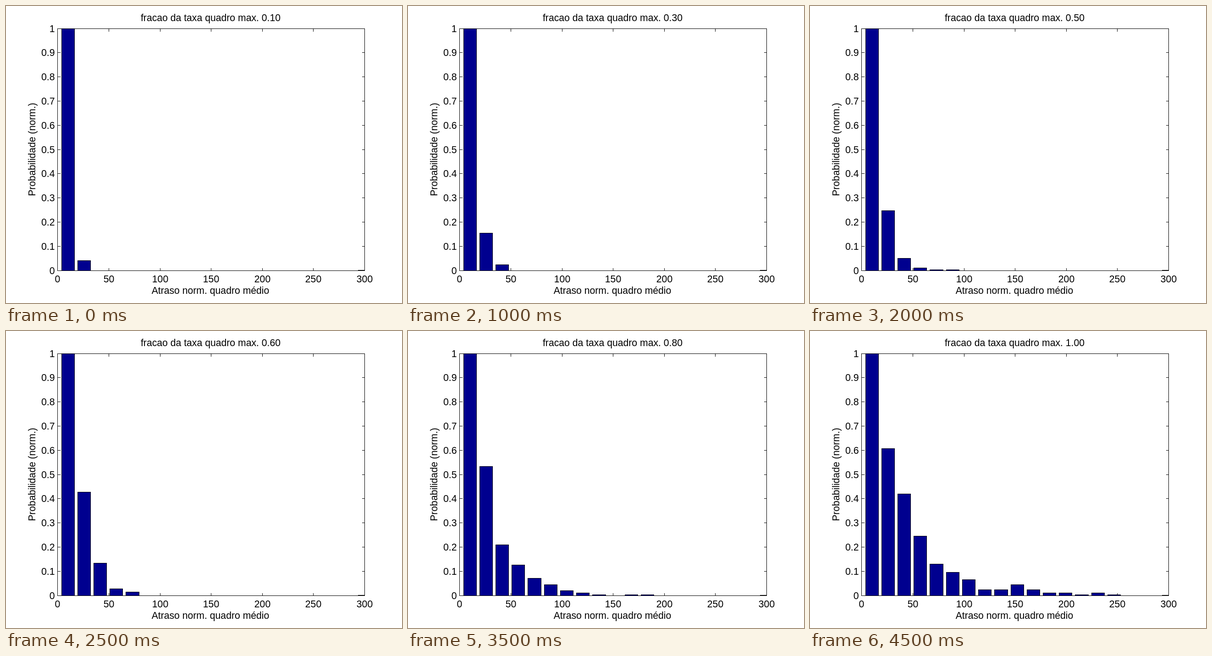
An HTML page that plays this animation: 864x648 px, repeating every 5 s.

```html
<!DOCTYPE html>
<html lang="pt">
<head>
<meta charset="utf-8">
<style>
  html, body { margin: 0; width: 100%; height: 100%; overflow: hidden; background: #fff; }
  svg { display: block; }
  text { font: 21.2px "Liberation Sans", Arial, Helvetica, sans-serif; text-anchor: middle; }
  .end { text-anchor: end; }
  path, rect { stroke: #000; stroke-width: 1; fill: none; shape-rendering: crispEdges; }
  rect { fill: #00008f; }
</style>
</head>
<body>
<svg width="864" height="648" viewBox="0 0 864 648">
  <text id="title" x="446.5" y="33"></text>
  <text x="446" y="628">Atraso norm. quadro médio</text>
  <text transform="translate(64 313) rotate(-90)">Probabilidade (norm.)</text>
  <g id="axes"></g>
  <g id="bars"></g>
  <path id="frame"/>
</svg>
<script>
const STEP = 500;
const LEFT = 112.3, RIGHT = 781.9, TOP = 48.6, BOTTOM = 576.7;
const TICK = 6;
const BAR_START = 120.6, BAR_PITCH = 35.22, BAR_WIDTH = 28.2;

// Bar heights in thousandths after the first bar, which is always 1.
const histograms = [
  [42],
  [92],
  [155, 24],
  [202, 36],
  [248, 50, 10, 3, 3],
  [428, 134, 28, 15],
  [480, 172, 70, 38, 17, 8, 3],
  [534, 209, 126, 72, 44, 20, 10, 3, 0, 3, 3],
  [641, 400, 215, 142, 90, 41, 41, 28, 24, 7, 10, 3, 0, 3, 3, 0, 0, 3],
  [607, 420, 246, 130, 96, 66, 24, 24, 45, 24, 10, 10, 3, 10, 3]
];

const byId = id => document.getElementById(id);
const snap = v => Math.round(v) + 0.5;
const xAt = v => snap(LEFT + (RIGHT - LEFT) * v / 300);
const yAt = v => snap(BOTTOM - (BOTTOM - TOP) * v);

function buildAxes() {
  const x0 = xAt(0), x1 = xAt(300), y0 = yAt(0), y1 = yAt(1);
  let ticks = '', labels = '';
  for (let v = 0; v <= 300; v += 50) {
    const x = xAt(v);
    ticks += `M${x} ${y0}v${-TICK}M${x} ${y1}v${TICK}`;
    labels += `<text x="${x}" y="603">${v}</text>`;
  }
  for (let i = 0; i <= 10; i++) {
    const y = yAt(i / 10);
    ticks += `M${x0} ${y}h${TICK}M${x1} ${y}h${-TICK}`;
    labels += `<text class="end" x="106.5" y="${y + 7.5}">${i / 10}</text>`;
  }
  // The baseline of the last bin sits one pixel above the axis.
  ticks += `M768 ${y0 - 1}H${x1}`;
  byId('axes').innerHTML = `<path d="${ticks}"/>${labels}`;
  byId('frame').setAttribute('d', `M${x0} ${y0}V${y1}H${x1}V${y0}Z`);
}

function bar(height, k) {
  if (!height) return '';
  const start = BAR_START + BAR_PITCH * k;
  const x = snap(start), y = yAt(height);
  const width = Math.min(snap(start + BAR_WIDTH), xAt(300)) - x;
  return `<rect x="${x}" y="${y}" width="${width}" height="${yAt(0) - y}"/>`;
}

let shown = -1;
function draw(now) {
  const index = Math.floor(now / STEP) % histograms.length;
  if (index !== shown) {
    shown = index;
    const heights = [1, ...histograms[index].map(h => h / 1000)];
    byId('bars').innerHTML = heights.map(bar).join('');
    byId('title').textContent =
      `fracao da taxa quadro max. ${((index + 1) / 10).toFixed(2)}`;
  }
}

buildAxes();
draw(0);
const begin = performance.now();
function loop() {
  draw(performance.now() - begin);
  requestAnimationFrame(loop);
}
requestAnimationFrame(loop);
</script>
</body>
</html>
```
